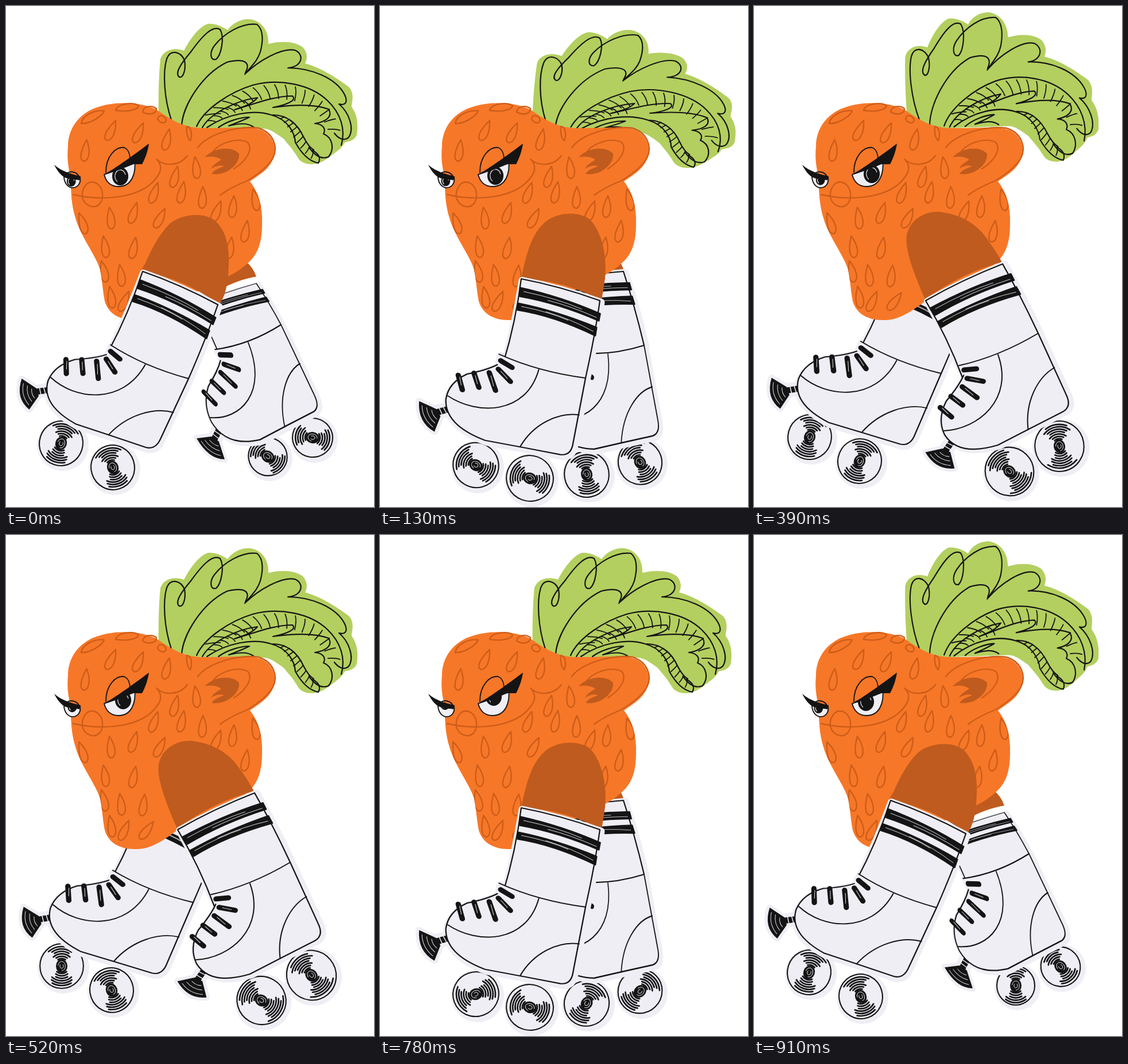
An HTML page with a canvas for the animation above (1040 ms loop, 641 px wide and 874 px high).

```html
<!DOCTYPE html>
<html lang="en">
<head>
<meta charset="utf-8">
<title>Skating carrot</title>
<style>
html, body { margin: 0; width: 100%; height: 100%; overflow: hidden; background: #fff; }
canvas { display: block; }
</style>
</head>
<body>
<canvas id="stage" width="641" height="874"></canvas>
<script>
const ctx = document.getElementById('stage').getContext('2d');
const INK = '#151415', PALE = '#efeef5', ORANGE = '#f77728', BROWN = '#bf5b1e', LINE = '#cd5d18', GREEN = '#b3cf5f';
const STEP = 130, COUNT = 8;
const path = d => new Path2D(d);

function fill(p, color) { ctx.fillStyle = color; ctx.fill(p); }
function stroke(p, color = INK, width = 2.2) {
  ctx.strokeStyle = color;
  ctx.lineWidth = width;
  ctx.stroke(p);
}
function within(draw) { ctx.save(); draw(); ctx.restore(); }

// Affine map that carries the points of one triangle onto another.
function warp(from, to) {
  const [[x0, y0], [x1, y1], [x2, y2]] = from;
  const det = (x1 - x0) * (y2 - y0) - (x2 - x0) * (y1 - y0);
  const solve = k => {
    const u = to[1][k] - to[0][k], v = to[2][k] - to[0][k];
    const gx = (u * (y2 - y0) - v * (y1 - y0)) / det;
    const gy = (v * (x1 - x0) - u * (x2 - x0)) / det;
    return [gx, gy, to[0][k] - gx * x0 - gy * y0];
  };
  const [a, c, e] = solve(0), [b, d, f] = solve(1);
  ctx.transform(a, b, c, d, e, f);
}

// ---- leaves
const leafBase = [[310, 210], [428, 24], [610, 210]];
const leafMid = leafBase;
const leafUp = [[310, 210], [412, 12], [598, 200]];
const leafLow = [[310, 210], [440, 43], [617, 225]];
const leafFill = path('M266 192C265 150 267 110 269 92C275 75 295 72 310 78C318 62 335 36 352 31C368 30 380 38 386 42C395 28 415 20 430 24C450 30 458 48 457 66C480 60 505 62 517 72C526 82 525 92 521 100C550 108 580 128 598 142C608 155 602 168 602 176C612 190 614 205 611 225C606 236 596 236 590 238C585 248 578 252 572 257C560 266 555 270 545 274C525 280 512 272 508 264C500 250 490 240 484 232C470 222 460 214 448 214L310 214Z');
const leafLines = [
  'M288 199C275 160 273 115 280 92C287 74 305 80 311 95C314 112 308 126 302 124C293 118 305 100 322 80C342 52 360 33 373 41C381 55 375 85 366 93C355 96 354 80 364 68C380 48 410 29 437 32C450 42 447 65 443 80C438 96 428 104 416 119',
  'M418 117C440 96 480 72 503 77C520 84 517 106 491 108C530 108 575 125 590 155C596 168 591 174 580 171C598 186 607 214 597 229C588 237 578 230 572 222',
  'M306 208C308 175 340 120 385 98C418 90 426 100 417 116',
  'M332 210C345 180 390 150 430 138C475 126 530 136 560 165C583 187 592 215 584 243',
  'M342 212C355 188 400 165 438 160C428 172 412 176 398 181C430 172 465 157 499 157C508 165 486 173 465 177C500 172 535 170 562 180C570 193 557 202 538 205C552 206 558 214 553 223C570 230 572 250 562 263C548 269 536 258 528 247',
  'M350 212C385 188 430 180 462 190C492 198 503 222 504 238C514 256 528 271 544 274C550 264 542 256 534 252',
  'M370 212C385 201 408 194 424 194C410 201 398 205 388 209C405 205 420 203 431 211',
  'M465 190C490 190 508 206 518 228C524 240 529 247 536 251'
].map(path);

function cubic(p, t) {
  const s = 1 - t, w = [s * s * s, 3 * s * s * t, 3 * s * t * t, t * t * t];
  return [0, 1].map(k => w.reduce((sum, v, i) => sum + v * p[i][k], 0));
}
function ribs(outer, inner, n, slant) {
  ctx.beginPath();
  for (let i = 1; i < n; i++) {
    const [x, y] = cubic(outer, i / n), [u, v] = cubic(inner, i / n + slant);
    ctx.moveTo(x, y);
    ctx.quadraticCurveTo((x + u) / 2 + 3, (y + v) / 2 - 2, u, v);
  }
  ctx.strokeStyle = INK;
  ctx.lineWidth = 1.8;
  ctx.stroke();
}
function leaves(pose) {
  within(() => {
    warp(leafBase, pose);
    fill(leafFill, GREEN);
    leafLines.forEach(p => stroke(p));
    ribs([[335, 205], [400, 118], [565, 100], [587, 240]], [[355, 200], [420, 150], [540, 140], [563, 222]], 17, 0.03);
    ribs([[470, 192], [500, 205], [498, 250], [544, 273]], [[480, 192], [515, 200], [516, 242], [546, 266]], 10, -0.05);
    ribs([[340, 210], [365, 185], [390, 172], [432, 161]], [[352, 212], [380, 190], [400, 182], [440, 178]], 7, 0.02);
  });
}

// ---- body
const body = path('M108 245C108 215 125 192 150 180C190 163 240 168 264 182C290 200 310 212 340 213C390 214 425 208 446 217C465 227 471 245 467 262C460 285 440 295 425 306C440 325 447 350 446 380C446 410 440 430 425 445C410 460 395 468 380 475L297 516C275 532 252 549 225 548C195 548 178 535 172 515C168 495 168 480 164 460C157 436 130 402 121 370C113 345 113 320 113 300C108 280 106 265 108 245Z');
const bodyLines = [
  'M117 329C170 341 238 336 264 297C273 284 269 274 262 267C275 280 302 280 316 261',
  'M150 307C162 308 169 320 168 332C167 345 159 351 150 350C138 348 131 337 133 326C135 314 142 307 150 307Z',
  'M334 247C350 225 400 208 440 213C465 221 475 245 465 265C455 283 435 296 420 305C400 313 385 321 373 330',
  'M358 259C366 240 402 228 421 238C431 250 419 270 397 284',
  'M131 205C133 190 155 181 171 183C167 193 146 206 131 205Z',
  'M191 182C194 170 222 167 231 174C229 183 206 185 191 182Z',
  'M238 185C239 175 253 172 262 179C262 189 248 191 238 185Z',
  'M264 197C266 188 276 190 279 199C277 207 267 204 264 197Z',
  'M315 210C323 211 325 224 321 235C315 230 314 218 315 210Z'
].map(path);
const earShade = path('M346 264C362 246 395 244 406 258C408 275 385 297 358 293C362 286 372 282 380 280C372 276 364 280 357 284C361 276 370 272 375 268C366 262 356 262 346 264Z');
const seed = path('M0-19C10 0 9 15 1 19C-8 19-9 4 0-19Z');
const seeds = [
  [138, 252, 8], [183, 217, 25], [231, 221, 25], [280, 233, 14], [331, 282, -6], [294, 298, 15], [258, 326, 20],
  [306, 325, 12], [342, 334, 3], [268, 370, 28], [182, 370, -6], [222, 361, 18], [133, 379, -18], [172, 420, -8],
  [222, 422, 12], [395, 350, 6], [434, 338, -12], [367, 358, 22], [417, 393, 10], [390, 422, 10], [239, 471, 8],
  [200, 470, -6], [170, 463, -12], [183, 508, -8], [206, 515, 25], [245, 515, 38]
];
function drawBody() {
  fill(body, ORANGE);
  within(() => {
    ctx.clip(body);
    for (const [x, y, tilt] of seeds) within(() => {
      ctx.translate(x, y);
      ctx.rotate(tilt * Math.PI / 180);
      stroke(seed, LINE, 2.4);
    });
  });
  bodyLines.forEach(p => stroke(p, LINE, 2.4));
  fill(earShade, BROWN);
}

// ---- eyes
const bigWhite = path('M171 294L224 268C227 292 219 315 196 315C182 315 174 306 171 294Z');
const bigLid = path('M174 290C174 262 191 245 206 247C213 250 216 259 216 268');
const bigLash = path('M170 295C190 283 220 262 249 240C247 254 242 267 237 276L222 276C210 281 185 291 170 295Z');
const smallWhite = path('M101 297L129 299C131 310 124 318 114 317C106 315 101 307 101 297Z');
const smallLid = path('M106 292C112 287 125 289 128 300');
const smallLash = path('M84 277C98 289 113 293 130 297L128 304C118 302 107 303 99 297C92 291 88 285 84 277Z');

function iris(x, y, r) {
  ctx.beginPath();
  ctx.ellipse(x, y, r * 0.88, r, 0, 0, 7);
  ctx.fillStyle = INK;
  ctx.fill();
  ctx.beginPath();
  ctx.ellipse(x, y, r * 0.58, r * 0.7, 0, 2.2, 6);
  ctx.strokeStyle = PALE;
  ctx.lineWidth = 1.2;
  ctx.stroke();
}
function eye(white, lid, lash, x, y, r) {
  fill(white, PALE);
  within(() => { ctx.clip(white); iris(x, y, r); });
  stroke(white, INK, 1.9);
  stroke(lid, INK, 1.9);
  fill(lash, INK);
}
function eyes([x, y]) {
  eye(bigWhite, bigLid, bigLash, x, y, 16);
  eye(smallWhite, smallLid, smallLash, 114 + (x - 200) / 3, 306 + (y - 297) * 0.65, 9);
}

// ---- skates: sock and shoe are hinged at the heel end of the ankle seam
const rest = [[272, 500], [413, 479], [445, 616], [244, 738], [458, 758]];
const sock = path('M272 500Q340 484 413 479Q430 540 445 616Q370 637 300 633Q290 570 272 500Z');
const sockEdge = path('M303 650Q294 575 272 500Q340 484 413 479Q430 540 445 616');
const bands = path('M276 515Q350 500 423 500L426 513Q350 513 282 530ZM284 542Q350 527 427 525L431 540Q350 537 288 554Z');
const bandNicks = path('M285 519Q345 506 390 506M330 516Q370 509 420 509M292 545Q340 534 376 534M335 536Q380 530 424 534');
const shoe = path('M300 633Q370 637 445 616L461 735Q465 758 448 763Q385 776 325 789Q255 790 243 745Q238 715 262 688Q290 668 303 652Z');
const shoeEdge = path('M445 616L461 735Q465 758 448 763Q385 776 325 789Q255 790 243 745Q238 715 262 688Q290 668 303 652');
const shoeLines = path('M300 633Q370 637 445 616M244 738C300 752 374 718 369 633M382 777C390 728 422 692 455 683');
const laces = path('M249 696L263 718M272 682L287 703M295 671L314 697M307 659L332 672M306 643L327 647');
const laceNicks = path('M252 698L259 711M275 685L283 698M299 675L309 691M312 661L326 669');
const stopper = path('M203 766L233 768L244 778L243 808Q212 803 203 766Z');
const stopperNicks = path('M210 772Q217 793 238 801M218 772Q224 787 239 793M227 773Q231 782 240 785');
const shaft = path('M237 773L256 757');
const shaftNicks = path('M238 765L246 774M243 760L252 769M248 756L257 764');

const MAPS = [[0, 1, 2], [2, 3, 4]];
function fit(pts, part, draw) {
  within(() => {
    warp(MAPS[part].map(i => rest[i]), MAPS[part].map(i => pts[i]));
    draw();
  });
}
function halo(p) {
  within(() => { ctx.translate(3, 2); stroke(p, PALE, 13); });
}
function skate({ pts, hideStopper }) {
  fit(pts, 0, () => halo(sock));
  fit(pts, 1, () => {
    halo(shoe);
    if (hideStopper) return;
    stroke(stopper, PALE, 11);
    stroke(shaft, PALE, 26);
    fill(stopper, INK);
    stroke(stopperNicks, PALE, 0.9);
    stroke(shaft, INK, 11);
    stroke(shaftNicks, PALE, 1.5);
  });
  fit(pts, 0, () => {
    fill(sock, PALE);
    fill(bands, INK);
    stroke(bands, INK, 2);
    stroke(bandNicks, PALE, 0.8);
    stroke(sockEdge);
  });
  fit(pts, 1, () => {
    fill(shoe, PALE);
    stroke(shoeEdge);
    stroke(shoeLines, INK, 2);
    stroke(laces, INK, 9);
    stroke(laceNicks, PALE, 0.9);
  });
}

function disc(x, y, r, color) {
  ctx.beginPath();
  ctx.arc(x, y, r, 0, 7);
  ctx.fillStyle = color;
  ctx.fill();
}
function wheel(x, y, r, angle) {
  disc(x + 3, y + 3, r + 6, PALE);
  within(() => {
    ctx.translate(x, y);
    ctx.rotate(angle * Math.PI / 180);
    ctx.strokeStyle = INK;
    ctx.lineWidth = 2.1;
    ctx.beginPath();
    ctx.ellipse(0, 0, r, r * 0.97, 0, 0, 7);
    ctx.stroke();
    ctx.lineWidth = 2.7;
    for (const side of [0, Math.PI])
      for (let q = 13; q < r - 4; q += 4.2) {
        const spread = 0.62 + 0.13 * Math.sin(q * 2 + side);
        ctx.beginPath();
        ctx.arc(0, 0, q, side - spread, side + spread);
        ctx.stroke();
      }
    ctx.beginPath();
    ctx.ellipse(0, 0, 12, 10, 0, 0, 7);
    ctx.fillStyle = INK;
    ctx.fill();
    ctx.strokeStyle = PALE;
    ctx.lineWidth = 0.9;
    for (const q of [4, 8]) {
      ctx.beginPath();
      ctx.ellipse(0, 0, q, q * 0.8, 0, q, q + 4.5);
      ctx.stroke();
    }
  });
}

// ---- walking poses; wheels are x, y, radius
const wideFront = {
  far: { pts: [[325, 522], [436, 484], [479, 556], [356, 718], [542, 701]], wheels: [[456, 786, 34], [534, 753, 35]],
    thigh: 'M360 470L387 471Q405 462 418 446Q430 455 436 472Q405 477 370 496Z' },
  near: { pts: [[238, 463], [369, 521], [318, 650], [78, 648], [255, 771]], wheels: [[96, 763, 39], [186, 805, 39]],
    thigh: 'M237 463C250 430 265 400 285 380C310 360 350 360 367 377C388 400 390 430 387 470C384 500 377 514 371 521Q310 475 237 463Z' }
};
const closeFront = {
  far: { pts: [[284, 484], [424, 463], [460, 592], [300, 715], [483, 745]], wheels: [[360, 817, 40], [453, 796, 39]],
    thigh: 'M385 462Q410 452 418 445L425 461Z', hideStopper: true },
  near: { pts: [[246, 476], [383, 514], [358, 649], [118, 680], [326, 782]], wheels: [[167, 801, 40], [261, 824, 41]],
    thigh: 'M246 476C255 430 265 395 290 375C315 357 350 360 365 372C388 395 396 440 392 475L386 514Q320 478 246 476Z' }
};
const closeBack = {
  far: { pts: [[262, 468], [397, 506], [371, 641], [129, 676], [338, 774]], wheels: [[165, 784, 40], [258, 815, 40]] },
  near: { pts: rest, wheels: [[328, 832, 42], [424, 813, 43]],
    thigh: 'M271 499C261 450 260 400 275 382C295 355 335 355 355 366C392 385 404 425 412 451L419 446L419 478Q340 481 271 499Z' }
};
const wideBack = {
  far: { pts: [[245, 458], [376, 515], [326, 641], [82, 645], [266, 765]], wheels: [[97, 752, 39], [184, 794, 39]] },
  near: { pts: [[299, 514], [433, 450], [495, 571], [331, 741], [547, 700]], wheels: [[445, 812, 43], [532, 768, 44]],
    thigh: 'M298 512C280 470 262 425 266 400C272 370 300 358 322 359C370 364 395 390 405 405Q420 425 432 447Q362 465 298 512Z' }
};

// spin: far pair, then near pair, in degrees
const steps = [
  { legs: wideFront, leaf: leafMid, gaze: [199, 297], spin: [35, 10, 108, 72] },
  { legs: closeFront, leaf: leafLow, gaze: [201, 296], spin: [80, 60, 30, 20] },
  { legs: closeBack, leaf: leafMid, gaze: [203, 295], spin: [-10, -10, 10, -10] },
  { legs: wideBack, leaf: leafUp, gaze: [205, 293], spin: [105, 112, 45, 80] },
  { legs: wideBack, leaf: leafMid, gaze: [204, 288], spin: [90, 70, 30, 50] },
  { legs: closeBack, leaf: leafLow, gaze: [202, 281], spin: [20, -5, 10, 0] },
  { legs: closeFront, leaf: leafMid, gaze: [198, 282], spin: [120, 135, -20, 20] },
  { legs: wideFront, leaf: leafUp, gaze: [195, 291], spin: [90, 50, 108, 72] }
];

function leg(part, spin) {
  if (part.thigh) fill(path(part.thigh), BROWN);
  part.wheels.forEach((w, i) => wheel(...w, spin[i]));
  skate(part);
}
function render(time) {
  const { legs, leaf, gaze, spin } = steps[Math.floor(time / STEP) % COUNT];
  ctx.fillStyle = '#fff';
  ctx.fillRect(0, 0, 641, 874);
  ctx.lineCap = ctx.lineJoin = 'round';
  leg(legs.far, spin);
  leaves(leaf);
  drawBody();
  eyes(gaze);
  leg(legs.near, spin.slice(2));
}

let start;
function tick(now) {
  start ??= now;
  render(Math.max(0, now - start));
  requestAnimationFrame(tick);
}
render(0);
requestAnimationFrame(tick);
</script>
</body>
</html>
```
